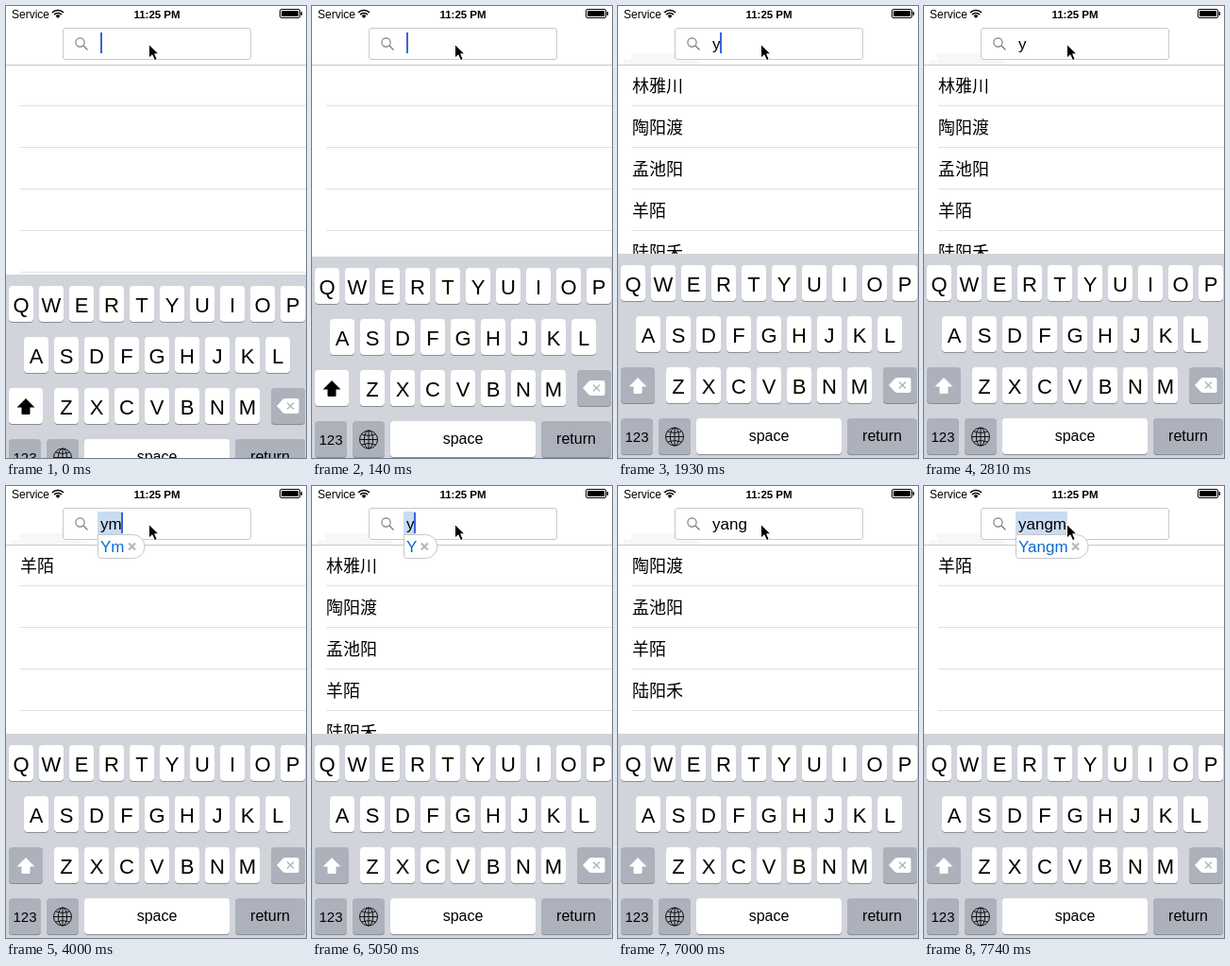
An HTML page with a canvas that plays this animation: 318 px wide and 478 px high, repeating every 8000 ms.

```html
<!DOCTYPE html>
<html lang="en">
<head>
<meta charset="utf-8">
<title>Pinyin search</title>
<style>
html, body { margin: 0; width: 100%; height: 100%; overflow: hidden; background: #fff; }
canvas { display: block; width: 318px; height: 478px; }
</style>
</head>
<body>
<canvas id="stage"></canvas>
<script>
const W = 318, H = 478, LOOP = 8000;
const canvas = document.getElementById('stage');
const ctx = canvas.getContext('2d');
const scale = window.devicePixelRatio || 1;
canvas.width = W * scale;
canvas.height = H * scale;

const LATIN = '"Liberation Sans", Arial, sans-serif';
const CJK = '"Noto Sans CJK SC", "Noto Sans CJK", sans-serif';
const LINE = '#c8c8ca', GREY_KEY = '#acb1bc';

const people = [
  { name: '林雅川', pinyin: 'lin ya chuan' },
  { name: '陶阳渡', pinyin: 'tao yang du' },
  { name: '孟池阳', pinyin: 'meng chi yang' },
  { name: '羊陌', pinyin: 'yang mo' },
  { name: '陆阳禾', pinyin: 'lu yang he' },
];

// start time, query, caret opacity, suggestion shown, keyboard offset
const steps = [
  [0, '', 1, false, 22],
  [140, '', 1, false, 3],
  [290, '', .5, false, 1],
  [440, '', 0],
  [740, '', .5],
  [890, '', 1],
  [1340, '', .5],
  [1490, '', 0],
  [1780, 'y', 0],
  [1930, 'y', 1],
  [2080, 'y', 1, true],
  [2520, 'y', .5, true],
  [2810, 'y', 0],
  [2960, 'ym', 1],
  [3110, 'ym', 1, true],
  [3400, 'ym', .5, true],
  [3550, 'ym', 0, true],
  [3850, 'ym', .5, true],
  [4000, 'ym', 1, true],
  [4450, 'y', 0],
  [4600, 'y', .5],
  [4750, 'y', 1],
  [5050, 'y', 1, true],
  [5350, 'y', 0],
  [5500, 'ya', 1],
  [5650, 'yan', 1],
  [5800, 'yang', 0],
  [5950, 'yang', 1],
  [6250, 'yang', 1, true],
  [6550, 'yang', .5, true],
  [6700, 'yang', 0, true],
  [7000, 'yang', 0],
  [7150, 'yangm', 1],
  [7290, 'yangm', 1, true],
  [7590, 'yangm', .5, true],
  [7740, 'yangm', 0, true],
];

function search(query) {
  if (!query) return [];
  return people.filter(({ pinyin }) => {
    const initials = pinyin.split(' ').map(word => word[0]).join('');
    return pinyin.replaceAll(' ', '').includes(query) || initials.includes(query);
  });
}

function rect(x, y, w, h, color) {
  ctx.fillStyle = color;
  ctx.fillRect(x, y, w, h);
}

function roundRect(x, y, w, h, radius, fill, stroke) {
  ctx.beginPath();
  ctx.roundRect(x, y, w, h, radius);
  paint(fill, stroke);
}

function paint(fill, stroke, width = 1) {
  if (fill) { ctx.fillStyle = fill; ctx.fill(); }
  if (stroke) { ctx.strokeStyle = stroke; ctx.lineWidth = width; ctx.stroke(); }
}

function shape(path, fill, stroke, width = 1) {
  const p = new Path2D(path);
  if (fill) { ctx.fillStyle = fill; ctx.fill(p); }
  if (stroke) { ctx.strokeStyle = stroke; ctx.lineWidth = width; ctx.stroke(p); }
}

function text(str, x, y, font, color = '#000', align = 'left') {
  ctx.font = font;
  ctx.fillStyle = color;
  ctx.textAlign = align;
  ctx.fillText(str, x, y);
}

function textWidth(str, font) {
  ctx.font = font;
  return ctx.measureText(str).width;
}

function drawStatusBar() {
  text('Service', 6, 12.5, '12px ' + LATIN);
  for (const r of [9, 6]) {
    ctx.beginPath();
    ctx.arc(55, 13, r - .5, -Math.PI * .75, -Math.PI * .25);
    paint(null, '#000', 1.7);
  }
  shape('M55 13 L52.6 10.4 A3.4 3.4 0 0 1 57.4 10.4 Z', '#000');
  text('11:25 PM', 160, 12.5, 'bold 11.5px ' + LATIN, '#000', 'center');
  roundRect(290.5, 3.5, 21, 9, 1.5, null, '#000');
  roundRect(292, 5, 18, 6, .5, '#000');
  roundRect(312.5, 6, 1.5, 4, 1, '#000');
}

function drawList(query) {
  for (let y = 105; y < 300; y += 44) rect(15, y, W - 15, 1, '#e0e0e2');
  search(query).forEach(({ name }, i) => text(name, 15, 90.5 + 44 * i, '18px ' + CJK));
}

function drawSearchBar(query, caret, suggesting) {
  const font = '17px ' + LATIN;
  if (query) {
    rect(14, 50, 46, 7, '#f7f7f7');
    rect(6, 57, 80, 5, '#f7f7f7');
  }
  rect(0, 62, W, 1, LINE);
  roundRect(60.5, 23.5, 199, 33, 2.5, '#fff', LINE);
  ctx.beginPath();
  ctx.arc(78.5, 38.5, 4.6, 0, 7);
  paint(null, '#77777c', 1.1);
  shape('M82 42 L86.5 46.5', null, '#77777c', 1.2);

  const end = 100 + textWidth(query, font);
  if (suggesting) {
    rect(97, 27, end - 96, 24, '#c9dcf1');
    drawSuggestion(query[0].toUpperCase() + query.slice(1), font);
  }
  text(query, 100, 46, font);
  ctx.globalAlpha = caret;
  rect(Math.round(end - .4), 28, 2, 22, '#3a63dd');
  ctx.globalAlpha = 1;
}

function drawSuggestion(word, font) {
  const end = 100 + textWidth(word, font), x = end + 8;
  roundRect(97.5, 51.5, end + 22 - 98, 25, [0, 12.5, 12.5, 3], '#fff', '#c4c6c9');
  text(word, 100, 70, font, '#0b6bd0');
  shape(`M${x - 3.5} 60.5 l7 7 m0 -7 l-7 7`, null, '#b4b4b6', 2);
}

function drawKey(x, y, w, fill = '#fff') {
  roundRect(x, y + 1, w, 38, 4, '#898c92');
  roundRect(x, y, w, 38, 4, fill);
}

function drawLetters(letters, x, y) {
  [...letters].forEach((letter, i) => {
    drawKey(x + 32 * i, y, 26);
    text(letter, x + 13 + 32 * i, y + 28, '22px ' + LATIN, '#000', 'center');
  });
}

function drawKeyboard(offset, shifted) {
  ctx.save();
  ctx.translate(0, offset);
  rect(0, 262, W, 220, '#d1d5db');
  drawLetters('QWERTYUIOP', 3, 274);
  drawLetters('ASDFGHJKL', 19, 328);
  drawLetters('ZXCVBNM', 51, 382);

  drawKey(3, 382, 36, shifted ? '#fff' : GREY_KEY);
  shape('M21 393 L30.5 402.5 H25.5 V409 Q25.5 410 24.5 410 H17.5 Q16.5 410 16.5 409 V402.5 H11.5 Z',
    shifted ? '#000' : '#fff');

  drawKey(281, 382, 36, GREY_KEY);
  shape('M287 401 L293.5 394 Q294.5 393 296 393 H308 Q310.5 393 310.5 395.5 V406.5 Q310.5 409 308 409 H296 Q294.5 409 293.5 408 Z', '#fff');
  shape('M298 397.5 l7 7 m0 -7 l-7 7', null, GREY_KEY, 1.3);

  drawKey(3, 436, 34, GREY_KEY);
  text('123', 20, 460.5, '15px ' + LATIN, '#000', 'center');
  drawKey(43, 436, 34, GREY_KEY);
  ctx.beginPath();
  ctx.arc(60, 455.5, 9.5, 0, 7);
  paint(null, '#111');
  ctx.beginPath();
  ctx.ellipse(60, 455.5, 4.6, 9.5, 0, 0, 7);
  paint(null, '#111');
  shape('M60 446 V465 M50.5 455.5 H69.5 M52.5 450 Q60 453 67.5 450 M52.5 461 Q60 458 67.5 461', null, '#111');
  drawKey(83, 436, 154);
  text('space', 160, 460, '16px ' + LATIN, '#000', 'center');
  drawKey(243, 436, 74, GREY_KEY);
  text('return', 280, 460, '16px ' + LATIN, '#000', 'center');
  ctx.restore();
}

function drawPointer() {
  shape('M151.5 40.5 V55 L155 51.8 L157.6 57.6 L160.2 56.4 L157.7 50.8 H162 Z', '#000', '#fff', 1);
}

function render(now) {
  const time = now % LOOP;
  const [, query, caret, suggesting = false, offset = 0] = steps.findLast(step => step[0] <= time);
  ctx.setTransform(scale, 0, 0, scale, 0, 0);
  rect(0, 0, W, H, '#fff');
  drawStatusBar();
  drawList(query);
  drawSearchBar(query, caret, suggesting);
  drawKeyboard(offset, !query);
  drawPointer();
}

let start;
function tick(now) {
  start ??= now;
  render(now - start);
  requestAnimationFrame(tick);
}
render(0);
requestAnimationFrame(tick);
</script>
</body>
</html>
```
